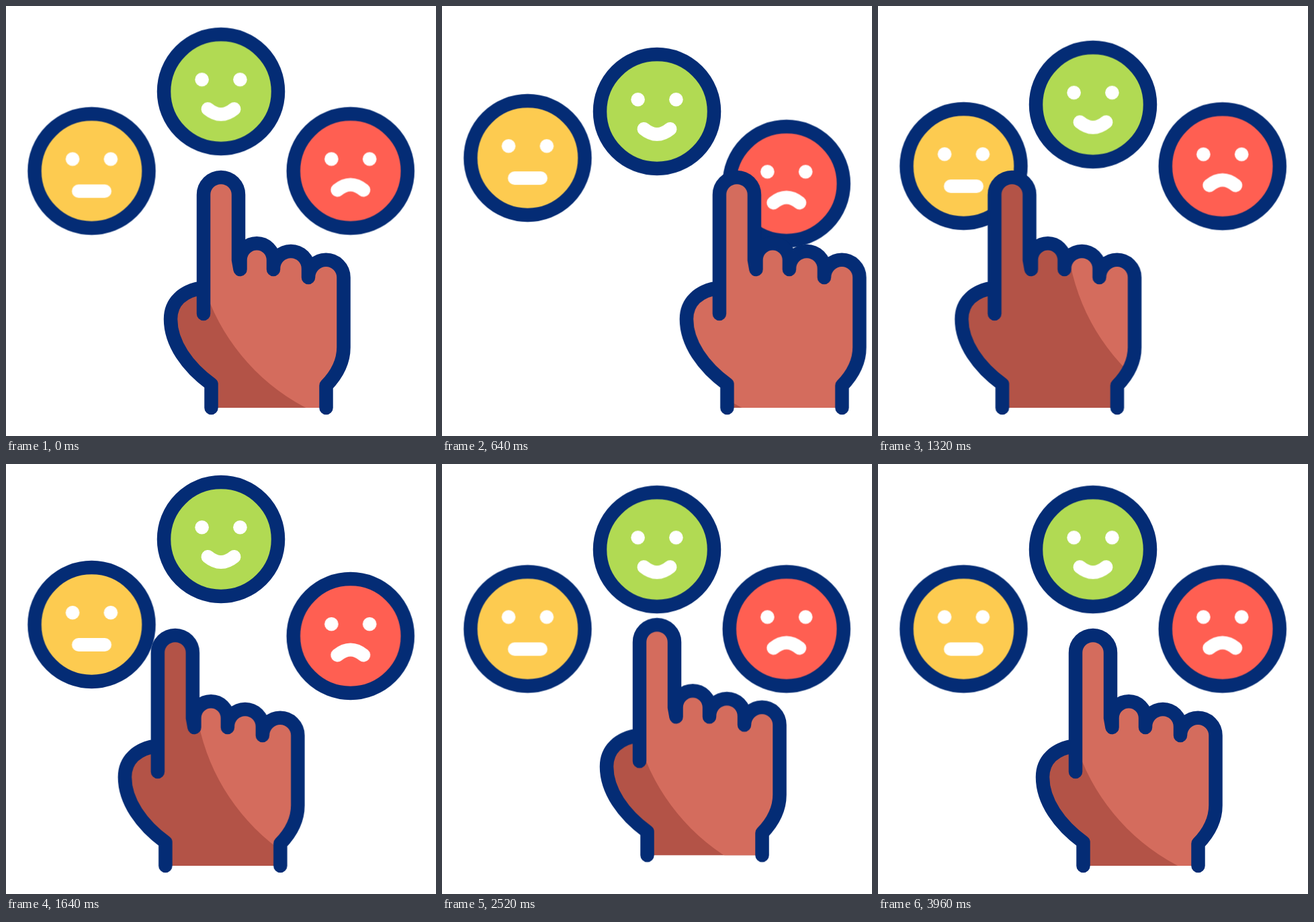
Write an HTML page that moves like this. It is 640x640 px and loops after 4 s.

```html
<!DOCTYPE html>
<html lang="en">
<head>
<meta charset="utf-8">
<title>Feedback faces</title>
<style>
  :root {
    --soft: cubic-bezier(.364, 0, .636, 1);
    --relaxed: path("M305.5 598V563C270 537 245 502 245 466C245 441 262 424 294 419L294 458L294 281A26 26 0 0 1 346 281L346 378L348.5 392V378A24.75 24.75 0 0 1 398 378V392V391A26 26 0 0 1 450 391V404A26.2 26.2 0 0 1 502.5 404V508C502.5 530 492 549 476.5 565V598");
    --pressed: path("M305.5 598V563C270 537 245 502 245 466C245 441 262 424 294 419L294 458L298 285A21 21 0 0 1 340 285L347 378L348.5 392V378A24.75 24.75 0 0 1 398 378V392V391A26 26 0 0 1 450 391V404A26.2 26.2 0 0 1 502.5 404V508C502.5 530 492 549 476.5 565V598");
  }
  html, body { margin: 0; width: 100%; height: 100%; overflow: hidden; background: #fff; }
  svg { display: block; width: 100%; height: 100%; }

  .bob, .press, .hand, .ring {
    animation: 4s var(--soft) infinite;
  }
  .bob { animation-name: bob; }
  .happy { animation-delay: .235s; }
  .sad { animation-delay: .44s; }
  .press { animation-name: press; }
  .ring { animation-name: ring; stroke-dasharray: 100 110; stroke-dashoffset: 105; }
  .hand { d: var(--relaxed); animation-name: move, point; }

  .rim { stroke: #042c75; stroke-width: 20.5; }
  .eyes { fill: #fff; }
  .mouth { fill: none; stroke: #fff; stroke-width: 20; stroke-linecap: round; }
  .line { fill: none; stroke: #042c75; stroke-width: 20.5; stroke-linecap: round; stroke-linejoin: round; }

  @keyframes bob {
    0%, 45%, 100% { transform: translateY(0); }
    9% { transform: translateY(32px); }
    18% { transform: translateY(-26px); }
    27% { transform: translateY(19.5px); }
    36% { transform: translateY(-16px); }
  }
  @keyframes move {
    0%, 49%, 58.25%, 99%, 100% { transform: translate(0, 0); }
    14.875% { transform: translate(121px, 0); }
    34.125% { transform: translate(-122.5px, 0); }
    77.25%, 80% { transform: translate(0, -106px); }
  }
  @keyframes point {
    0%, 74%, 83%, 100% { d: var(--relaxed); }
    77%, 80% { d: var(--pressed); }
  }
  @keyframes press {
    0%, 74%, 83%, 100% { transform: scale(1); }
    77%, 80% { transform: scale(.97); }
  }
  @keyframes ring {
    0%, 73% { stroke-dashoffset: 105; }
    84%, 86% { stroke-dashoffset: 0; }
    97.5%, 100% { stroke-dashoffset: -105; }
  }
</style>
</head>
<body>
<svg viewBox="0 0 640 640">
  <defs>
    <g id="eyes" class="eyes">
      <circle cx="-28.4" cy="-17.7" r="10.3"/>
      <circle cx="28.4" cy="-17.7" r="10.3"/>
    </g>
    <clipPath id="skin"><path class="hand"/></clipPath>
  </defs>

  <g transform="translate(127.5 245.5)">
    <g class="bob">
      <circle class="rim" r="85" fill="#fdcb50"/>
      <use href="#eyes"/>
      <path class="mouth" d="M-19.5 30H19.5"/>
    </g>
  </g>

  <g transform="translate(320 127.2)">
    <g class="bob happy">
      <g class="press">
        <circle class="rim" r="85" fill="#b1da53"/>
        <circle class="ring" r="85" pathLength="100" transform="rotate(90)"
          fill="none" stroke="#fdcb50" stroke-width="22" stroke-linecap="round"/>
        <use href="#eyes"/>
        <path class="mouth" d="M-19.5 26Q0 42 19.5 26"/>
      </g>
    </g>
  </g>

  <g transform="translate(512.7 245.5)">
    <g class="bob sad">
      <circle class="rim" r="85" fill="#ff5f52"/>
      <use href="#eyes"/>
      <path class="mouth" d="M-19.5 28.5Q0 12.5 19.5 28.5"/>
    </g>
  </g>

  <!-- The light stays put while the hand moves through it -->
  <path class="hand" fill="#b35347"/>
  <g clip-path="url(#skin)">
    <circle cx="588" cy="325" r="307.5" fill="#d46c5d"/>
  </g>
  <path class="hand line"/>
</svg>
</body>
</html>
```
